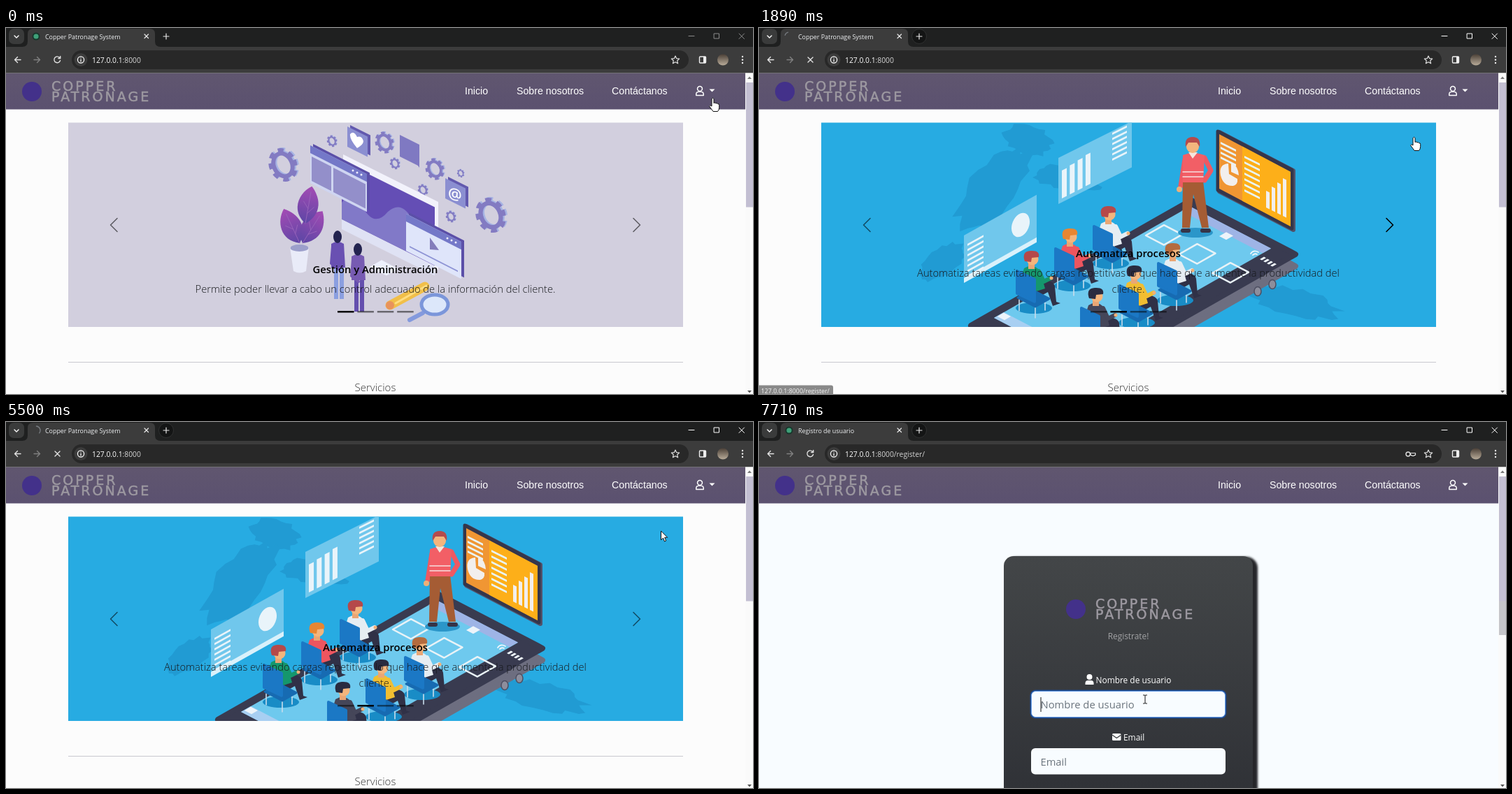
Recreate the animation shown at these times as an HTML page. Size 1068 by 524 pixels, loop 8 s.

```html
<!DOCTYPE html>
<html lang="es">
<head>
<meta charset="utf-8">
<title>Registro</title>
<style>
html, body { margin: 0; width: 100%; height: 100%; overflow: hidden; background: #fcfcfc; }
svg { display: block; width: 100vw; height: 100vh; }
text { font-family: "Open Sans", "Noto Sans", sans-serif; white-space: pre; }
.nav { font-family: "Liberation Sans", Arial, sans-serif; }
.brand { font-family: "DejaVu Sans", sans-serif; letter-spacing: 3px; stroke: #9d99a1; stroke-width: .5; }
.line { fill: none; stroke-linecap: round; stroke-linejoin: round; }
.round { stroke-linejoin: round; }
</style>
</head>
<body>
<svg id="stage" viewBox="0 0 1068 524"></svg>
<script>
const LOOP = 8000;

// Markup helpers
const path = (d, fill, more = '') => `<path d="${d}" fill="${fill}" ${more}/>`;
const line = (d, color, w = 1, more = '') => `<path class="line" d="${d}" stroke="${color}" stroke-width="${w}" ${more}/>`;
const rect = (x, y, w, h, fill, rx = 0, more = '') => `<rect x="${x}" y="${y}" width="${w}" height="${h}" rx="${rx}" fill="${fill}" ${more}/>`;
const oval = (x, y, rx, ry, fill, more = '') => `<ellipse cx="${x}" cy="${y}" rx="${rx}" ry="${ry}" fill="${fill}" ${more}/>`;
const disc = (x, y, r, fill, more = '') => oval(x, y, r, r, fill, more);
const text = (x, y, size, fill, s, more = '') => `<text x="${x}" y="${y}" font-size="${size}" fill="${fill}" ${more}>${s}</text>`;
const group = (id, body, more = '') => `<g id="${id}" ${more}>${body}</g>`;
const at = (x, y, body, more = '') => `<g transform="translate(${x} ${y}) ${more}">${body}</g>`;
const repeat = (n, make) => Array.from({ length: n }, (_, i) => make(i)).join('');
const stroke = (color, w) => `class="round" stroke="${color}" stroke-width="${w}"`;
const mid = 'text-anchor="middle"';

// Isometric faces: an upright panel, and a tile lying on the floor
const wall = (x, y, w, h, slope, fill, more) => path(`M${x} ${y}l${w} ${w * slope}v${h}l${-w} ${-w * slope}z`, fill, more);
const floor = (x, y, u, v, fill, more) => path(`M${x} ${y}l${u} ${-.57 * u}l${v} ${.52 * v}l${-u} ${.57 * u}z`, fill, more);
const stripes = (x, y, n, w, gap, slope) => repeat(n, i => wall(x, y + i * gap, w, 3, slope, '#e9f4fa'));

function randomFrom(seed) {
  return () => (seed = seed * 16807 % 2147483647) / 2147483647;
}

const brand = (x, y) => at(x, y,
  disc(37, 91, 14, '#43318a') +
  text(65, 90, 19, '#9d99a1', 'COPPER', 'class="brand"') +
  text(65, 105, 19, '#9d99a1', 'PATRONAGE', 'class="brand"'));

const userShape = 'M-4 -4a4 4 0 1 0 8 0a4 4 0 1 0 -8 0M-6 7v-2q0 -4 4 -4h4q4 0 4 4v2z';
const user = (x, y, k, more = 'fill="currentColor"') => at(x, y, `<path d="${userShape}" ${more}/>`, `scale(${k})`);

function chrome() {
  return rect(0, 0, 1068, 28, '#1f2020') + rect(0, 27, 1068, 37.5, '#3c3c3c') +
    path('M23 27q8 0 8 -8v-11q0 -7 8 -7h166q8 0 8 7v11q0 8 8 8z', '#3c3c3c') +
    rect(4, 1, 22, 22, '#3a3b3b', 7) + line('M12 11l3 3 3 -3', '#fff', 1.4) +
    group('icon', disc(43, 12, 5.5, '#17372c') + disc(43, 12, 3.6, '#3fa179')) +
    line('', '#777b80', 1.3, 'id="spin"') +
    text(56, 16, 8.9, '#eef0f2', '', 'id="title"') +
    line('M198 9l5.5 5.5m0 -5.5l-5.5 5.5', '#e8e8e8', 1.2) +
    disc(229, 12, 10.5, '#141515', 'id="plusBg" stroke="#303131"') +
    line('M225 12h8m-4 -4v8', '#e8e8e8', 1.2) +
    group('controls', '<path class="line" d="M976 11.500h8M1012.500 8h7v7h-7zM1048 8l7.500 7.500m0 -7.500l-7.500 7.500"/>') +
    line('M21 45.5h-8.5m4 -4l-4 4 4 4', '#e3e3e3', 1.4) +
    line('M40 45.5h8.5m-4 -4l4 4 -4 4', '#808080', 1.4) +
    line('M76.5 42.3a4.4 4.4 0 1 0 1 4.2M77.7 40.5v3h-3', '#e3e3e3', 1.4, 'id="reload"') +
    line('M70 42l7 7m0 -7l-7 7', '#e3e3e3', 1.4, 'id="stop"') +
    rect(94, 32, 882, 27, '#282828', 13.5) + disc(107, 45.5, 9.5, '#3c3c3c') +
    disc(107, 45.5, 4.6, 'none', stroke('#fff', 1.2)) + line('M107 45v3M107 43v.1', '#fff', 1.2) +
    text(123, 49.5, 10.3, '#d5d5d5', '<tspan fill="#fff">127.0.0.1</tspan>:8000<tspan id="route">/register/</tspan>') +
    group('key', disc(928, 46, 3, 'none', stroke('#ddd', 1.4)) + line('M931.5 44.5h7v3h-2v1h-3v-1h-2z', '#ddd', 1.2)) +
    line('M957 40l1.7 3.7 4 .4 -3 2.7 .9 4 -3.6 -2.1 -3.6 2.1 .9 -4 -3 -2.7 4 -.4z', '#ddd', 1.2) +
    rect(991.5, 41, 9, 9, 'none', 1, stroke('#eee', 1.4)) + rect(997, 41, 4, 9, '#eee') +
    disc(1025, 45.5, 8, 'url(#photo)') + repeat(3, i => disc(1053, 41 + i * 4.5, 1.2, '#eee'));
}

function navbar() {
  const link = (x, s) => text(x, 95, 14.2, '#fff', s, 'class="nav"');
  return rect(0, 64.5, 1057, 52, 'url(#bar)') + brand(0, 0) +
    link(656, 'Inicio') + link(730, 'Sobre nosotros') + link(866, 'Contáctanos') +
    group('account', user(992, 90.5, .87, 'class="line" stroke="currentColor" stroke-width="1.7"') +
      path('M1005.5 87.5h8l-4 4z', 'currentColor'));
}

function gear(x, y, r) {
  const ring = (dx, color) => at(dx, 0,
    oval(0, 0, r * .65, r * .85, 'none', `stroke-width="${r * .3}"`) +
    oval(0, 0, r * .85, r * 1.08, 'none', `stroke-width="${r * .3}" stroke-dasharray="${r * .4} ${r * .37}"`), `scale(1)" stroke="${color}`);
  return at(x, y, ring(r * .12, '#a6b3e3') + ring(0, '#837bc2'), 'rotate(-24)');
}

function slideOne() {
  const gears = repeat(3, i => gear(541 + 68 * i + 4 * i * i, 164 + 24 * i + 14 * i * i, 13 + 4 * i * (i - 1)) + gear(556 + 40 * i, 194 + 38 * i, 7)) +
    gear(396, 196, 20) + gear(466, 162, 7) + gear(650, 208, 5);
  const leaf = i => at(420 + i * 4, 308 - 28 * (i === 2), path('M0 0C-24 -15 -17 -42 0 -54C17 -38 20 -16 0 0', 'url(#leaf)') +
    line('M0 0V-46M0 -15l8 -10M0 -22l-8 -9', '#9a66bc', .8), `rotate(${[-25, 32, 10][i]})`);
  const tile = (x, y, mark) => wall(x + 4, y - 2, 29, 29, .5, '#6259ae') + wall(x, y, 29, 29, .5, '#8b8fd1') + at(x, y, mark);
  const person = (x, y, top, legs) => at(x, y,
    rect(-4, 36, 6, 55, legs) + rect(4, 36, 6, 55, legs) + path('M-8 12q9 -6 18 0l2 34h-20z', top) +
    line('M-6 16l-2 24 10 8', top, 4) + oval(1, 2, 6, 9, '#23234f'));
  const frame = (x, y, w, h, body) => wall(x + 4, y - 2, w, h, .51, '#5b4fa8') + wall(x, y, w, h, .51, body) + wall(x, y, w, 11, .51, '#7478c8') +
    repeat(3, i => disc(x + w - 20 + i * 6, y + (w - 20) * .51 + 5 + i * 3, 1.5, '#eef'));
  return rect(89, 135, 879, 293, '#d2cfde') + gears +
    wall(482, 181, 136, 98, .5, '#f2f2fb') + wall(480, 190, 133, 84, .5, '#644eb5') +
    path('M480 250q15 -20 31 8t35 5q20 -18 36 13t31 5v59l-133 -66z', '#8179c8') + wall(480, 274, 133, 14, .5, '#dfe2f4') +
    frame(435, 168, 81, 54, '#cfd5f1') + repeat(2, i => wall(437 + i * 31, 184 + i * 16, 28 + i * 18, 35, .51, '#938fca')) +
    frame(572, 266, 79, 53, '#dfe5fa') + path('M606 300l13 18 -13 -1z', '#837cbb') + wall(577, 312, 69, 2, .51, '#8e94d5') +
    tile(488, 141, path('M14 31q-11 -13 -10 -20q5 -6 10 4q7 -2 9 6q0 5 -9 10z', '#fff')) +
    wall(563, 153, 28, 31, .5, '#7f79c2') + path('M583 188l8 12v-10z', '#7f79c2') +
    tile(628, 215, text(4, 27, 22, '#fff', '@', 'font-weight="600" transform="skewY(14)"')) +
    repeat(3, leaf) + path('M406 314q13 -7 27 0l-4 34q-9 5 -18 0z', '#e9ebf8') + oval(419.5, 315, 13, 5, '#9c9fcb') +
    person(473, 297, '#6950b2', '#8b9fe0') + floor(520, 342, 17, 24, '#edf0fc') + person(502, 315, '#775bb2', '#644fae') +
    line('M549 397l50 -27', '#f1bf49', 13) + line('M557 394l44 -25', '#ffde82', 3) + disc(549, 397, 6, '#e8935c') +
    line('M577 418l19 -10', '#849add', 6) + oval(613, 396, 19, 14, '#dce7fa', stroke('#7b96da', 5));
}

function seated(x, y, hair, shirt) {
  return at(x, y,
    oval(4, 70, 26, 8, '#198cc6') +
    path('M-3 34l23 -4q13 2 14 9l2 22 6 2 -11 4 -7 -20 -16 9z', '#303147') +
    path('M-10 13q13 -8 23 4l7 25 -25 8 -12 -15z', shirt) + line('M11 17l7 15 10 -5', shirt, 6) + disc(29, 27, 2.5, '#efb078') +
    rect(-4, 3, 9, 11, '#e9a675') + disc(2, 0, 8.5, '#f3b57d') +
    path('M-9 3q-5 -14 8 -15q14 -1 12 9l-10 1 -1 6z', hair) +
    line('M-17 58v16M6 68v16M20 57v16', '#c9dcec', 1.6) +
    floor(-19, 55, 20, 25, '#176bb2', stroke('#176bb2', 3)) + wall(-20, 17, 25, 32, .47, '#1b78c5', stroke('#1b78c5', 4)));
}

// A ragged coastline around an ellipse
function land(x, y, rx, ry, turn, seed) {
  const random = randomFrom(seed), n = 30;
  const points = Array.from({ length: n }, (_, i) => {
    const a = i / n * 2 * Math.PI, k = .8 + .3 * random();
    return `${rx * k * Math.cos(a)} ${ry * k * Math.sin(a)}`;
  });
  return at(x, y, path('M' + points.join('L') + 'z', '#219bd3'), `rotate(${turn})`);
}

function slideTwo() {
  const backHair = ['#b5494a', '#e78632', '#b5494a'], backShirt = ['#15976d', '#ed555f', '#e6edf2'];
  const frontHair = ['#292b40', '#292b40', '#b46b3e'], frontShirt = ['#454659', '#f1be32', '#e6edf2'];
  // Far seats first
  const row = (x, y, hair, shirt) => repeat(3, i => seated(x + 55 * (2 - i), y - 32 * (2 - i), hair[2 - i], shirt[2 - i]));
  return rect(89, 135, 879, 293, '#27abe2') +
    land(385, 160, 38, 22, 15, 11) + land(335, 230, 78, 34, -52, 5) + land(262, 335, 42, 20, -35, 8) +
    land(440, 215, 52, 18, 10, 21) + land(765, 392, 70, 20, 14, 17) +
    wall(293, 297, 104, 67, -.56, '#70c7ec') + wall(293, 358, 104, 7, -.56, '#d9f1fb') +
    stripes(298, 309, 7, 23, 7.5, -.55) + oval(374, 282, 12, 18, '#e9f4fa', 'transform="rotate(22 374 282)"') +
    wall(428, 186, 105, 66, -.5, '#70c7ec') + stripes(505, 150, 6, 21, 7.4, -.5) +
    repeat(4, i => wall(433 + 11.3 * i, 204 - 7.3 * i, 7, 40 + 1.5 * i, -.5, '#e9f4fa')) +
    // tablet
    floor(303, 443, 315, 149, '#6d6e80', stroke('#6d6e80', 8)) + floor(303, 426, 315, 149, '#393b50', stroke('#393b50', 8)) +
    floor(336, 415, 280, 116, '#6ec9ee') + floor(336, 415, 14, 116, '#a8cff2') + floor(604, 262, 12, 116, '#9eb4e6') +
    floor(658, 298, 10, 10, '#edf4fa') + floor(341, 413, 9, 10, '#edf4fa') +
    repeat(4, i => floor(716 + i * 5, 331 + i * 3, 6, 3, '#eef6fb')) + line('M703 323q4 -6 11 -2m-8 4q3 -3 6 -1', '#eef6fb', 1.8) +
    repeat(3, i => floor(553 + 47.5 * i, 297 + 27 * i, 26, 26, 'none', stroke('#e9f3f7', 2.5))) +
    repeat(2, i => oval(713 + 21 * i, 377 - 10 * i, 5, 6.5, '#8d8e9c', stroke('#4d4e61', 1.5))) +
    // board
    wall(658, 149, 106, 85, .52, '#51526b', stroke('#51526b', 6)) + wall(656, 148, 106, 84, .52, '#34364b', stroke('#34364b', 5)) +
    wall(658, 152, 102, 78, .53, '#f09633') + wall(691, 169.5, 69, 78, .53, '#fdaf19') +
    stripes(660, 163, 4, 22, 7, .5) + stripes(694, 183, 7, 22, 8, .5) +
    path('M672 209l-1 -15q-14 1 -11 17q4 16 18 15q7 -2 6 -10z', '#f2efed') + path('M675 206v-13q10 4 11 18z', '#f2efed') +
    repeat(4, i => wall(725 + 8 * i, 233 - 6 * i, 5, 24 + 10 * i, .5, '#f2efed')) +
    // presenter
    oval(624, 293, 25, 7, '#2b96c9') + line('M609 188l-6 38M637 186l9 18 -9 14', '#ee5962', 7) + disc(601, 231, 4, '#efb078') +
    path('M606 219h29l8 67h-10l-12 -48 -5 48h-11z', '#a55c34') + line('M606 290h8M634 290h9', '#353448', 6) +
    path('M606 182q14 -6 31 0l-2 39h-29z', '#f25f66') + line('M606 206h29M606 213h29', '#f6dfdf', 1.5) +
    path('M614 178h13l-7 9z', '#f4e7dd') + disc(620, 170, 9, '#f3b57d') + path('M610 170q-2 -14 10 -14q12 0 10 14l-4 -6h-12z', '#b44b4c') +
    row(389, 331, backHair, backShirt) + row(481, 384, frontHair, frontShirt);
}

function caption(title, y, rows) {
  return text(528, y, 14.8, '#000', title, mid + ' font-weight="600"') +
    rows.map((s, i) => text(528, y + 28 + i * 23, 14.7, '#16181b', s, mid + ' font-weight="300"')).join('');
}

function home() {
  return rect(0, 116, 1057, 408, '#fcfcfc') + '<g clip-path="url(#frame)">' +
    group('slide1', slideOne() + caption('Gestión y Administración', 351, ['Permite poder llevar a cabo un control adecuado de la información del cliente.'])) +
    group('slide2', slideTwo() + caption('Automatiza procesos', 327.5, ['Automatiza tareas evitando cargas repetitivas lo que hace que aumente la productividad del', 'cliente.'])) + '</g>' +
    repeat(4, i => rect(474 + i * 28.4, 405, 23.5, 2.5, '#000', 0, 'class="dash"')) +
    line('M159 272.5l-9.5 9.5 9.5 9.5', '#000', 1.6, 'opacity=".55"') + line('M897 272.5l9.5 9.5 -9.5 9.5', '#000', 1.6, 'id="next"') +
    rect(89, 478, 879, 1, '#c9c8d0') + text(528, 520, 15, '#333', 'Servicios', mid + ' font-weight="300"');
}

function register() {
  return rect(0, 116, 1057, 408, '#f8fcff') +
    rect(353, 193, 360, 360, '#26282b', 16, 'filter="url(#soft)"') + rect(350, 192, 356, 350, 'url(#card)', 14) +
    brand(416, 177) + text(528, 311, 11.9, '#a2a3a5', 'Registrate!', mid) +
    user(472.5, 369, 1, 'fill="#fff"') + text(481.5, 374, 11.9, '#fff', 'Nombre de usuario') +
    rect(387.5, 383.5, 281, 41, '#1d498d', 8) + rect(389.5, 385.5, 277, 37, '#f8fcff', 6, 'stroke="#6fa3ea"') +
    text(402.5, 410, 14.8, '#6c757d', 'Nombre de usuario') + rect(402.5, 394, 1, 21, '#111', 0, 'id="caret"') +
    rect(505, 446, 12.5, 10, '#fff', 1.5) + line('M505.5 448.5l5.8 4 5.8 -4', '#34373b', 1.2) + text(521, 455.5, 11.9, '#fff', 'Email') +
    rect(389, 467, 278, 37.5, '#f8fcff', 6) + text(402.5, 491.5, 14.7, '#6c757d', 'Email');
}

function menu() {
  const item = (x, y, s) => text(x, y, 12.6, 'currentColor', s, 'class="nav"');
  return group('menu', rect(841, 110.5, 206, 101, '#fff', 5, 'stroke="#c8c8cc"') +
    rect(841.5, 142, 205, 25, '#f8f9fa', 0, 'id="hover"') +
    line('M854 128.5h7m-3 -3.5l3.5 3.5 -3.5 3.5M862 124h2q1.5 0 1.5 1.5v6q0 1.5 -1.5 1.5h-2', 'currentColor', 1.9) + item(870, 133, 'Iniciar sesión') +
    group('signup', user(859, 153.5, .85) + line('M867 150.5v5m-2.5 -2.5h5', 'currentColor', 1.5) + item(873, 158, 'Registrarse')) +
    rect(841, 173, 206, 1, '#d6d6d8') +
    user(857.5, 190, .6) + user(862, 193.5, .7) + disc(866.5, 194, 2.3, 'none', stroke('currentColor', 1.8)) + disc(866, 187.5, 2, 'currentColor') +
    item(873, 196.5, 'Ingresar como Administrador'), 'color="#212529"');
}

const outline = stroke('#111', 1);
const cursors =
  group('hand', path('M-1.5 1.5q1.5 -2.5 3 0v6q2 -1.5 3 .5q2 -1 2.7 .8q2 -.6 2 1.7v3q0 4 -2.2 6h-6.5q-2 -3 -5.5 -7.5q1 -2.5 3.5 0z', '#fff', outline)) +
  group('arrow', path('M0 0v13l3 -3 2 5 2.2 -1 -2 -4.7h4z', '#fff', outline)) +
  group('beam', line('M-2.5 -6h2l.5 .5 .5 -.5h2M0 -5.5v11M-2.5 6h2l.5 -.5 .5 .5h2', '#111', 1));

const fade = (id, a, b) => `<linearGradient id="${id}" x2="0" y2="1"><stop stop-color="${a}"/><stop offset="1" stop-color="${b}"/></linearGradient>`;

document.getElementById('stage').innerHTML =
  '<defs><clipPath id="frame"><rect x="89" y="135.500" width="879" height="292.500"/></clipPath>' +
  '<filter id="soft"><feGaussianBlur stdDeviation="1.800"/></filter>' +
  fade('bar', '#60566f', '#5b5170') + fade('card', '#434648', '#2f3136') + fade('leaf', '#a44bb4', '#5c46a5') + fade('photo', '#4b4037', '#b8ab99') + '</defs>' +
  group('home', home()) + group('register', register()) + navbar() + chrome() +
  rect(1057, 64.5, 11, 460, '#fafafa') + rect(1058, 256, 10, 49, '#c5c5c9', 0, 'id="thumbTail"') + rect(1058, 78, 10, 178.5, '#c3bfd2') +
  path('M1060 73h6l-3 -3.5z', '#777') + path('M1060 519h6l-3 3.5z', '#555') +
  menu() +
  group('status', rect(-3, 511.5, 109, 16, '#505050', 3) + text(3, 522.5, 8.85, '#f2f2f2', '127.0.0.1:8000/register/')) +
  group('cursor', cursors);

const el = {};
document.querySelectorAll('[id]').forEach(n => el[n.id] = n);
const dashes = document.querySelectorAll('.dash');
const show = (id, on) => el[id].style.display = on ? '' : 'none';
const set = (id, name, value) => el[id].setAttribute(name, value);

const clamp = v => Math.max(0, Math.min(1, v));
const progress = (t, from, to) => clamp((t - from) / (to - from));
// Moves in n equal jumps, the first at once
const jumps = (t, from, to, n) => t < from ? 0 : (Math.floor(progress(t, from, to) * (n - 1) + .01) + 1) / n;

// The spinner ticks every 67 ms and stalls in these spans
const stalls = [[1890, 2330], [3220, 3370], [3970, 4120], [4170, 4620], [4710, 5160], [6190, 6330]];
function spinTime(t) {
  const stall = stalls.find(([a, b]) => t >= a && t < b);
  return stall ? stall[0] : 1890 + Math.floor((t - 1890) / 67) * 67;
}

function arc(from, sweep) {
  const p = a => `${43 + 6 * Math.cos(a * Math.PI / 180)} ${12 + 6 * Math.sin(a * Math.PI / 180)}`;
  return `M${p(from)}A6 6 0 0 1 ${p(from + sweep)}`;
}

function spinner(t) {
  const age = spinTime(t) - 1890;
  if (t >= 6330) return ['#28b5ad', arc(95 + (age - 4840) * .27, 165)];
  const sweep = Math.min(125, 60 + age * .027);
  return ['#777b80', arc(225 - age * .2727 - sweep / 2, sweep)];
}

function pointer(t) {
  if (t >= 7020) return ['beam', t < 7640 ? 556 : 552, 397];
  const enter = jumps(t, 620, 910, 5), leave = jumps(t, 6395, 6660, 5);
  return [t < 4170 ? 'hand' : 'arrow', 1010.5 - 74 * enter - 132 * leave, 100 + 56 * enter + 32.5 * leave];
}

function accountColor(t) {
  if (t < 70 || t >= 1890) return '#fff';
  return t < 360 ? '#8b8298' : t < 620 ? '#4b4459' : '#111';
}

function draw(t) {
  const first = t < 70, busy = t >= 1890 && t < 6790, arrived = t >= 6330, done = t >= 6790, pressed = t >= 1600;
  show('home', !done); show('register', done); show('thumbTail', done);
  show('slide1', first); show('slide2', !first); show('plusBg', !first);
  dashes.forEach((d, i) => d.setAttribute('opacity', i === (first ? 0 : 1) ? 1 : .5));
  set('controls', 'stroke', first ? '#8b8b8b' : '#fff');
  el.title.textContent = arrived ? 'Registro de usuario' : 'Copper Patronage System';
  show('route', arrived); show('key', arrived);
  show('reload', !busy); show('stop', busy);
  show('icon', !busy); show('spin', busy);
  const [color, d] = spinner(t);
  set('spin', 'stroke', color); set('spin', 'd', d);

  set('account', 'color', accountColor(t));
  set('next', 'opacity', t < 1890 ? .55 : 1 - .45 * jumps(t, 4620, 4710, 2));
  show('menu', t >= 360 && t < 1890);
  show('hover', t >= 840);
  set('hover', 'fill', pressed ? '#0d6efd' : '#f8f9fa');
  set('signup', 'color', pressed ? '#fff' : '#212529');
  set('status', 'opacity', jumps(t, 1240, 1380, 3) - jumps(t, 1890, 2397, 3));
  show('caret', t < 7020 || t >= 7640);

  const [kind, x, y] = pointer(t);
  ['hand', 'arrow', 'beam'].forEach(c => show(c, c === kind));
  set('cursor', 'transform', `translate(${x} ${y})`);
}

const start = performance.now();
function frame() {
  draw((performance.now() - start) % LOOP);
  requestAnimationFrame(frame);
}
frame();
</script>
</body>
</html>
```
